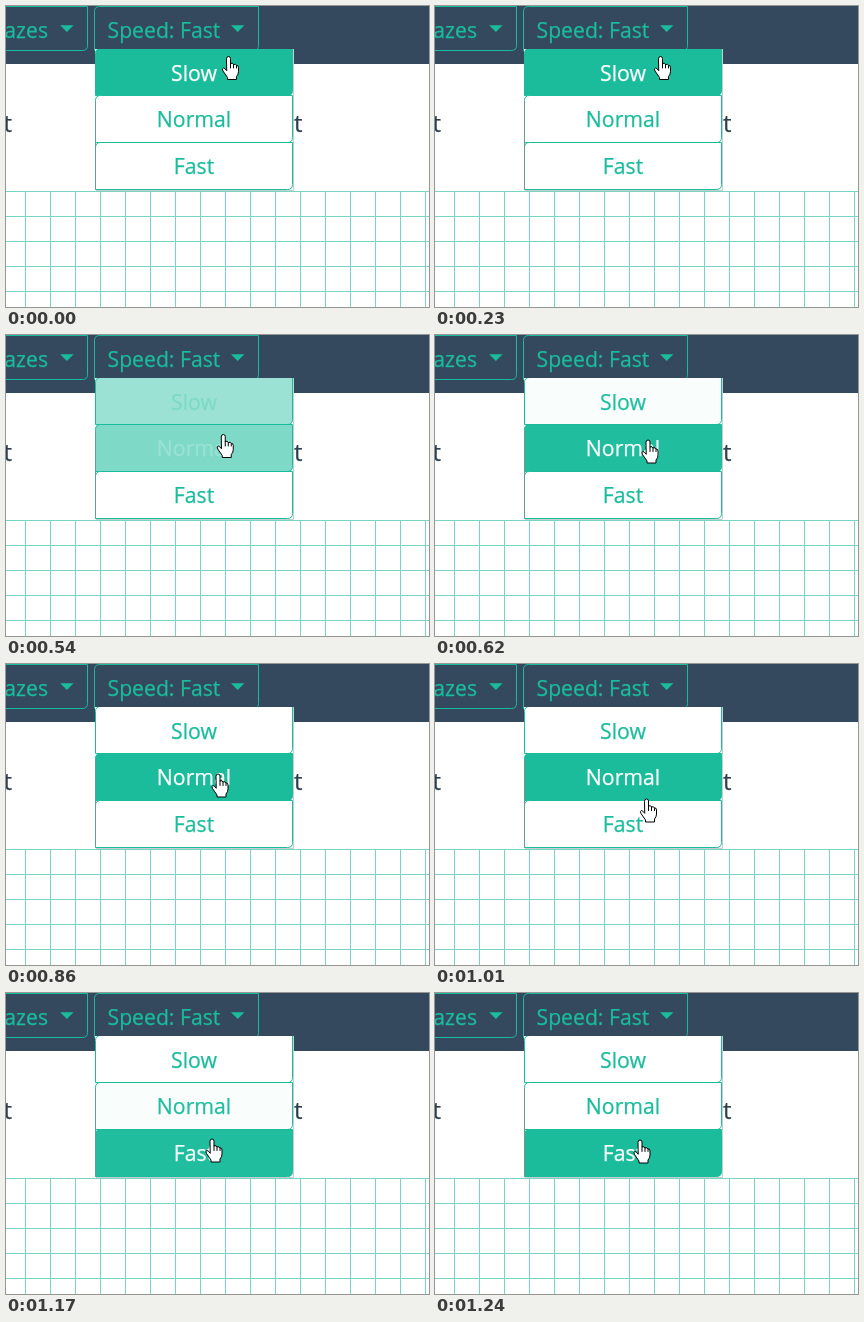
Animation, 423 px wide and 301 px high, one loop 1.7 s. Source, as an HTML page:

```html
<!DOCTYPE html>
<html lang="en">
<head>
<meta charset="utf-8">
<title>Speed menu</title>
<style>
  html, body { margin: 0; width: 100%; height: 100%; overflow: hidden; background: #fff; }
  svg { display: block; width: 100vw; height: 100vh; color: #1abc9c; }
  text {
    font: 21.2px "Open Sans", "Noto Sans", sans-serif;
    fill: currentColor; stroke: currentColor; stroke-width: .25;
  }
  .label { font-size: 24px; color: #2c3e50; text-anchor: end; }
  .line { fill: none; stroke: currentColor; }
</style>
</head>
<body>
<svg viewBox="0 0 423 301">
  <clipPath id="below"><rect y="43" width="423" height="258"/></clipPath>
  <rect width="423" height="301" fill="#fff"/>
  <path id="grid" fill="none" stroke="#7ad4c4"/>
  <rect width="423" height="58" fill="#34495e"/>
  <g id="buttons"></g>
  <text x="42" y="32" text-anchor="end">Mazes</text>
  <text x="101.5" y="32">Speed: Fast</text>
  <path fill="currentColor" d="M54.2 19.2h13.4l-6.7 6.7zM225 19.2h13.4l-6.7 6.7z"/>
  <text class="label" x="6" y="126">Start</text>
  <text class="label" x="296.5" y="126">t</text>
  <rect x="89" y="43" width="198" height="141" fill="#fff"/>
  <path d="M287.5 43V184.5H90" fill="none" stroke="#c6cfcf"/>
  <g id="menu" clip-path="url(#below)"></g>
  <path d="M89.5 95V183.5" stroke="#6c9a91"/>
  <g id="hand" stroke="#000" stroke-linejoin="round" stroke-linecap="round">
    <path fill="#fff" d="M-2 2Q-2 0 0 0Q2 0 2 2V7Q4.5 6 5 8Q7.5 7 8 9Q10 8.5 10 11V15Q10 18 8 20V23H-1V21L-5.5 14.5Q-7 12 -5 11.5Q-3.8 11.5 -2 14Z"/>
    <path fill="none" d="M2 7V11.5M5 8V11.5M8 9.5V11.5"/>
  </g>
</svg>
<script>
const LOOP = 1700;
const TICK = 77.5;
const LAST = 16;
const GREEN = [26, 188, 156];
const WHITE = [255, 255, 255];
const $ = id => document.getElementById(id);

// Pointer key points: tick, x, y
const path = [
  [0, 222.5, 50.5], [3, 225.5, 50.5], [6, 221.5, 94], [8, 213, 105],
  [11, 212, 110], [13, 211.5, 135], [14, 207, 145], [LAST, 205, 147]
];

// Tick at which each item gains the highlight
const enters = [-2, 6.32, 13.32, Infinity];

function add(parent, tag, attrs, text = '') {
  const el = document.createElementNS('http://www.w3.org/2000/svg', tag);
  for (const key in attrs) el.setAttribute(key, attrs[key]);
  el.textContent = text;
  parent.append(el);
  return el;
}

// Box with its top left and bottom right corners rounded
function box(parent, left, top, right, bottom, r = 5) {
  const d = `M${left} ${top + r}q0 ${-r} ${r} ${-r}H${right}V${bottom - r}q0 ${r} ${-r} ${r}H${left}Z`;
  return add(parent, 'path', { class: 'line', d });
}

const lerp = (a, b, p) => a + (b - a) * p;
const mix = (a, b, p) => `rgb(${a.map((v, i) => Math.round(lerp(v, b[i], p)))})`;

// Two ticks long, easing out
function fade(age) {
  const p = Math.min(1, Math.max(0, age / 2));
  return 1 - (1 - p) ** 2;
}

function pointer(tick) {
  const i = Math.max(1, path.findIndex(point => point[0] >= tick));
  const [t0, x0, y0] = path[i - 1];
  const [t1, x1, y1] = path[i];
  const p = (tick - t0) / (t1 - t0);
  return [lerp(x0, x1, p), lerp(y0, y1, p)];
}

let grid = '';
for (let x = 19.5; x < 423; x += 25) grid += `M${x} 185V301`;
for (let y = 185.5; y < 301; y += 25) grid += `M0 ${y}H423`;
$('grid').setAttribute('d', grid);

box($('buttons'), -30.5, 0.5, 81.5, 44.5);
box($('buttons'), 88.5, 0.5, 252.5, 44.5);

const items = ['Slow', 'Normal', 'Fast'].map((name, i) => {
  const top = 42.5 + 47 * i;
  return {
    back: box($('menu'), 89.5, top, 286.5, top + 47),
    text: add($('menu'), 'text', { x: 188, y: Math.floor(75 + 46.5 * i), 'text-anchor': 'middle' }, name)
  };
});

function draw(time) {
  let tick = Math.min(LAST, Math.floor((time + 7.5) / TICK));
  if (tick % 8 === 2) tick--; // short rests
  $('hand').setAttribute('transform', `translate(${pointer(tick)})`);
  items.forEach(({ back, text }, i) => {
    const glow = fade(tick - enters[i]) - fade(tick - enters[i + 1]);
    back.style.fill = mix(WHITE, GREEN, glow);
    text.style.color = mix(GREEN, WHITE, glow);
  });
}

const begin = performance.now();
function frame() {
  draw((performance.now() - begin) % LOOP);
  requestAnimationFrame(frame);
}
frame();
</script>
</body>
</html>
```
